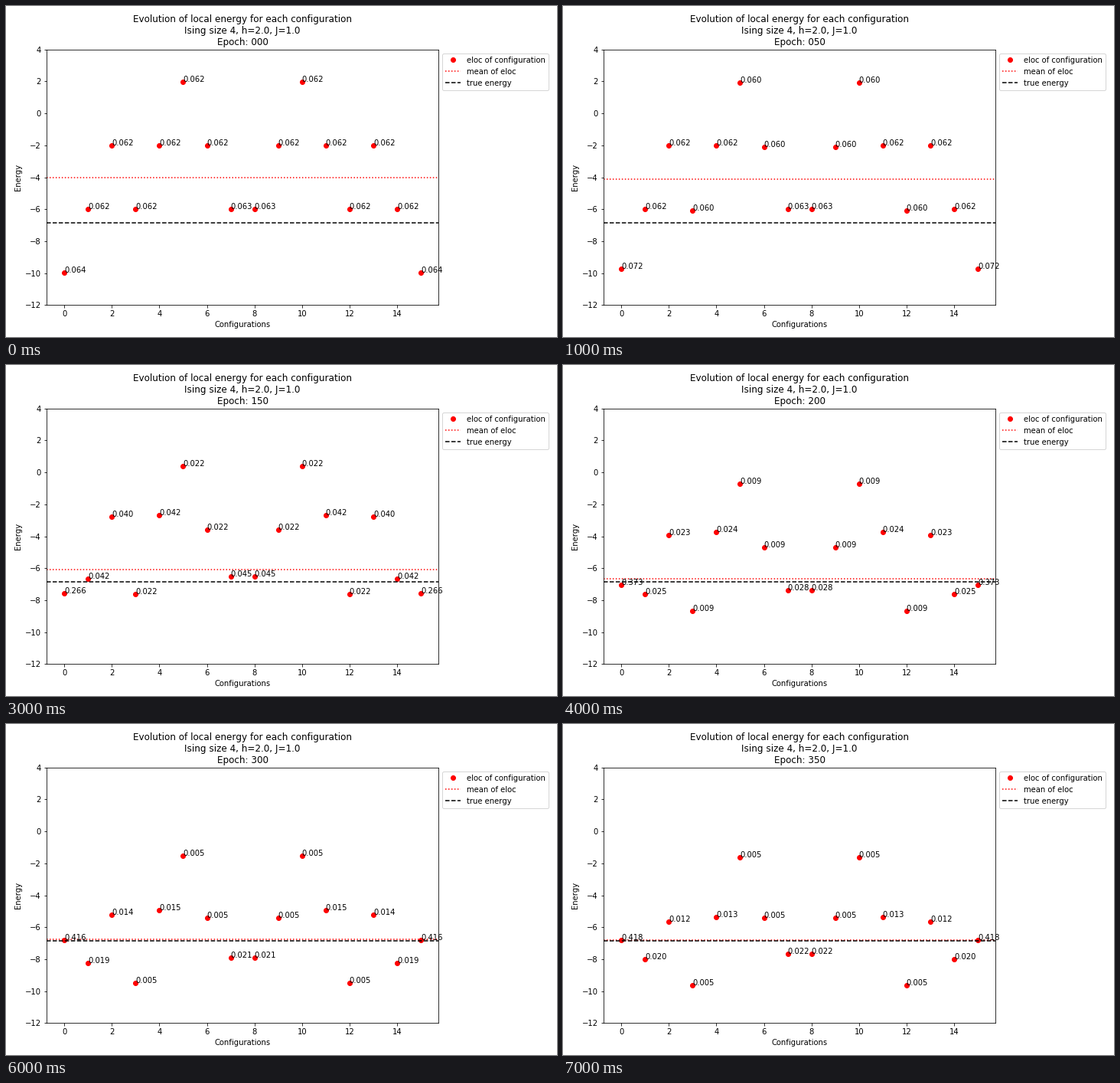
A matplotlib script for the animation above (8000 ms loop, 720 by 432 pixels).

```python
import numpy as np
import matplotlib.pyplot as plt
from matplotlib.animation import FuncAnimation

STEPS = 8
EPOCHS_PER_STEP = 50
SITES = 4
STATES = 2 ** SITES
COUPLING, FIELD = 2.0, 1.0

# Wave function cosh(w.s)^POWER, whose weights grow along a logistic curve.
POWER = 4.5
SHARES = np.array([0.250, 0.260, 0.251, 0.239])
BULK = np.array([-1, 1, 1, -1])

plt.rcParams["text.kerning_factor"] = 6

xs = np.arange(STATES)
spins = 1 - 2 * (xs[:, None] >> np.arange(SITES) & 1)


def hamiltonian():
    """Open Ising chain in a transverse field."""
    bonds = (spins[:, 1:] * spins[:, :-1]).sum(axis=1)
    ham = np.diag(-COUPLING * bonds)
    for k in range(SITES):
        ham[xs, xs ^ (1 << k)] = -FIELD
    return ham


HAM = hamiltonian()
TRUE_ENERGY = np.linalg.eigvalsh(HAM)[0]


def weights(step):
    total = 1.089 / (1 + np.exp(2.69 - 1.21 * step))
    # The inner sites gain weight late in training.
    drift = 0.02 * (step / (STEPS - 1)) ** 4
    return total * (SHARES + drift * BULK)


def measure(step):
    """Probability and local energy of each state, and the mean energy."""
    amps = np.cosh(spins @ weights(step)) ** POWER
    probs = amps ** 2 / np.sum(amps ** 2)
    energy = HAM @ amps / amps
    return probs, energy, probs @ energy


def title(step):
    return ("Evolution of local energy for each configuration\n"
            "Ising size 4, h=2.0, J=1.0\n"
            f"Epoch: {step * EPOCHS_PER_STEP:03d}")


fig, ax = plt.subplots(figsize=(10, 6), dpi=72)
dots, = ax.plot(xs, xs * 0, "ro", label="eloc of configuration")
mean_line = ax.axhline(0, color="red", linestyle=":", label="mean of eloc")
ax.axhline(TRUE_ENERGY, color="black", linestyle="--", label="true energy")
labels = [ax.text(x, 0, "") for x in xs]


def update(step):
    probs, energy, mean = measure(step)
    dots.set_ydata(energy)
    mean_line.set_ydata([mean, mean])
    for label, y, p in zip(labels, energy, probs):
        label.set_y(y)
        label.set_text(f"{p:.3f}")
    ax.set_title(title(step))
    return [dots, mean_line, *labels]


ax.set_xlim(-0.75, 15.75)
ax.set_ylim(-12, 4)
ax.set_xticks(range(0, 15, 2))
ax.set_xlabel("Configurations")
ax.set_ylabel("Energy")
ax.legend(loc="upper left", bbox_to_anchor=(1, 1))
update(0)
fig.tight_layout()

anim = FuncAnimation(fig, update, frames=STEPS, interval=1000,
                     repeat=True, repeat_delay=0)
plt.show()
```
